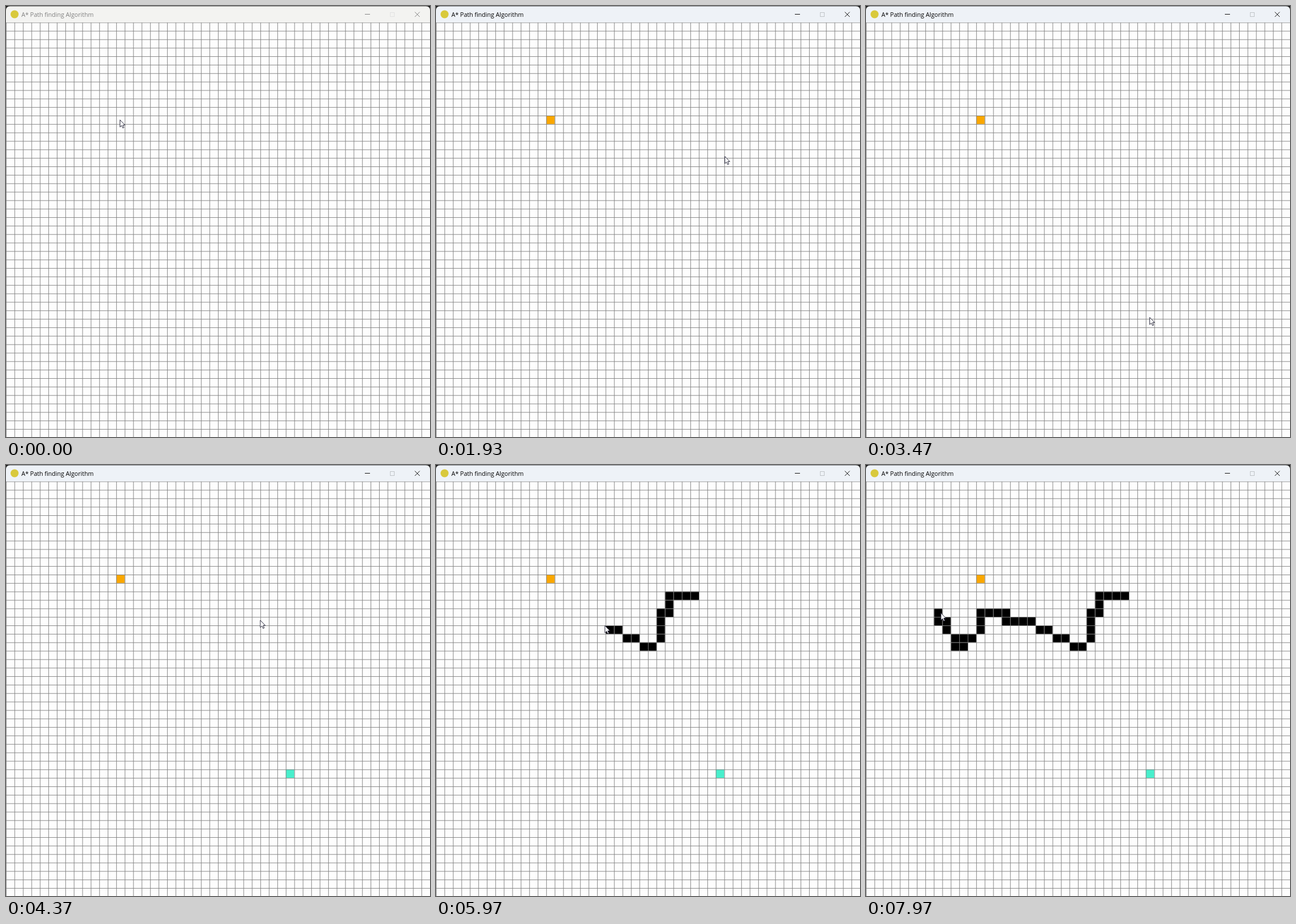
These frames come from a looping animation (742 by 755 pixels, 8000 ms). An HTML page:

```html
<!DOCTYPE html>
<html lang="en">
<head>
<meta charset="utf-8">
<title>A* Path finding Algorithm</title>
<style>
  html, body { margin: 0; width: 100%; height: 100%; overflow: hidden; background: #fdfdfd; }
  svg { display: block; width: 742px; height: 755px; }
  text { font: 10.6px "Open Sans", "Noto Sans", sans-serif; }
</style>
</head>
<body>
<svg viewBox="0 0 742 755">
  <rect width="742" height="755" fill="#fdfdfd"/>
  <g id="cells"></g>
  <path id="grid" stroke="#808080"/>
  <rect width="742" height="20" fill="#1c1c1c"/>
  <path id="bar" d="M0 28.75V8Q0 .6 7 .6H735Q742 .6 742 8V28.75Z"/>
  <circle cx="15" cy="14.5" r="7" fill="#d9c93c"/>
  <text id="title" x="27" y="18.5">A* Path finding Algorithm</text>
  <path id="buttons" d="M628 14.5H637M715.5 10.5L724 19M724 10.5L715.5 19" fill="none"/>
  <rect id="maximize" x="672.5" y="11.5" width="7" height="7" fill="none"/>
  <path id="cursor" d="M.5 .5V13L3.4 10.4L5.4 14.8L7.4 13.9L5.5 9.6H9.2Z" fill="#fff" stroke="#15152a" stroke-width=".9"/>
</svg>
<script>
const LOOP = 8000;
// The window is shown slightly reduced: 16 px cells under a 31 px title bar.
const SCALE = 742 / 800, CELL = 16 * SCALE, TOP = 31 * SCALE;
const FOCUS = 430, START = 1150, END = 3650, DRAW = 4700;
const $ = id => document.getElementById(id);
const mix = (a, b, k) => a + (b - a) * k;
const mixPoint = (p, q, k) => [mix(p[0], q[0], k), mix(p[1], q[1], k)];
const ease = k => k * k * (3 - 2 * k);

function set(el, attrs) {
  for (const name in attrs) el.setAttribute(name, attrs[name]);
}

function addCell([c, r], fill) {
  const el = document.createElementNS($('cells').namespaceURI, 'rect');
  set(el, { x: c * CELL, y: TOP + r * CELL, width: CELL, height: CELL, fill });
  $('cells').append(el);
  return el;
}

// Wall cells as unit steps: left, up, down and the diagonals.
const STEPS = { L: [-1, 0], U: [0, -1], D: [0, 1], Z: [-1, 1], Q: [-1, -1] };
const walls = [[30, 13]];
for (const s of 'LLLDDLDDDZLQLQLQLLLULLLDDZLDLUQULU') {
  const [c, r] = walls[walls.length - 1];
  walls.push([c + STEPS[s][0], r + STEPS[s][1]]);
}
const LAST = walls.length - 1;

const startCell = addCell([13, 11], '#faa700');
const endCell = addCell([33, 34], '#48efcc');
const wallCells = walls.map(w => addCell(w, '#000'));

let lines = '';
for (let i = 0; i < 50; i++) {
  const at = i * CELL + SCALE / 2;
  lines += `M${at} ${TOP}V755M0 ${TOP + at}H742`;
}
set($('grid'), { d: lines, 'stroke-width': SCALE });

const trail = [...walls, [9, 14]].map(([c, r]) => [(c + .5) * CELL, TOP + (r + .5) * CELL]);

function trailAt(u) {
  u = Math.max(0, Math.min(trail.length - 1, u));
  const i = Math.min(Math.floor(u), trail.length - 2);
  return mixPoint(trail[i], trail[i + 1], u - i);
}

// Time, x, y of the pointer before the walls are drawn.
const moves = [
  [0, 199, 199], [1350, 199, 199], [1930, 505, 263], [2250, 508, 275],
  [3250, 496, 545], [3800, 496, 545], [4370, 444.5, 271.5], [DRAW, ...trail[0]]
];

// Progress along the wall, in cells.
function wallProgress(t) {
  return t < 5970 ? mix(0, 15.6, (t - DRAW) / (5970 - DRAW))
                  : Math.min(LAST, mix(15.6, LAST, (t - 5970) / 1990));
}

function pointer(t) {
  if (t >= DRAW) {
    const u = wallProgress(t);
    return mixPoint(trailAt(u - .6), trailAt(u + .6), .5);
  }
  const i = moves.findIndex(m => m[0] > t);
  const [t0, ...p] = moves[i - 1], [t1, ...q] = moves[i];
  return mixPoint(p, q, ease((t - t0) / (t1 - t0)));
}

const show = (el, on) => set(el, { visibility: on ? 'visible' : 'hidden' });

function render(t) {
  const active = t >= FOCUS;
  set($('bar'), { fill: active ? '#eef2f7' : '#f3f3f1' });
  set($('title'), { fill: active ? '#000' : '#808080' });
  set($('buttons'), { stroke: active ? '#111' : '#858585' });
  set($('maximize'), { stroke: active ? '#c0c4c8' : '#e2e2e2' });
  show(startCell, t >= START);
  show(endCell, t >= END);
  const u = wallProgress(t);
  wallCells.forEach((el, i) => show(el, t >= DRAW && i <= u));
  set($('cursor'), { transform: `translate(${pointer(t)})` });
}

const begin = performance.now();
function tick() {
  render((performance.now() - begin) % LOOP);
  requestAnimationFrame(tick);
}
tick();
</script>
</body>
</html>
```
